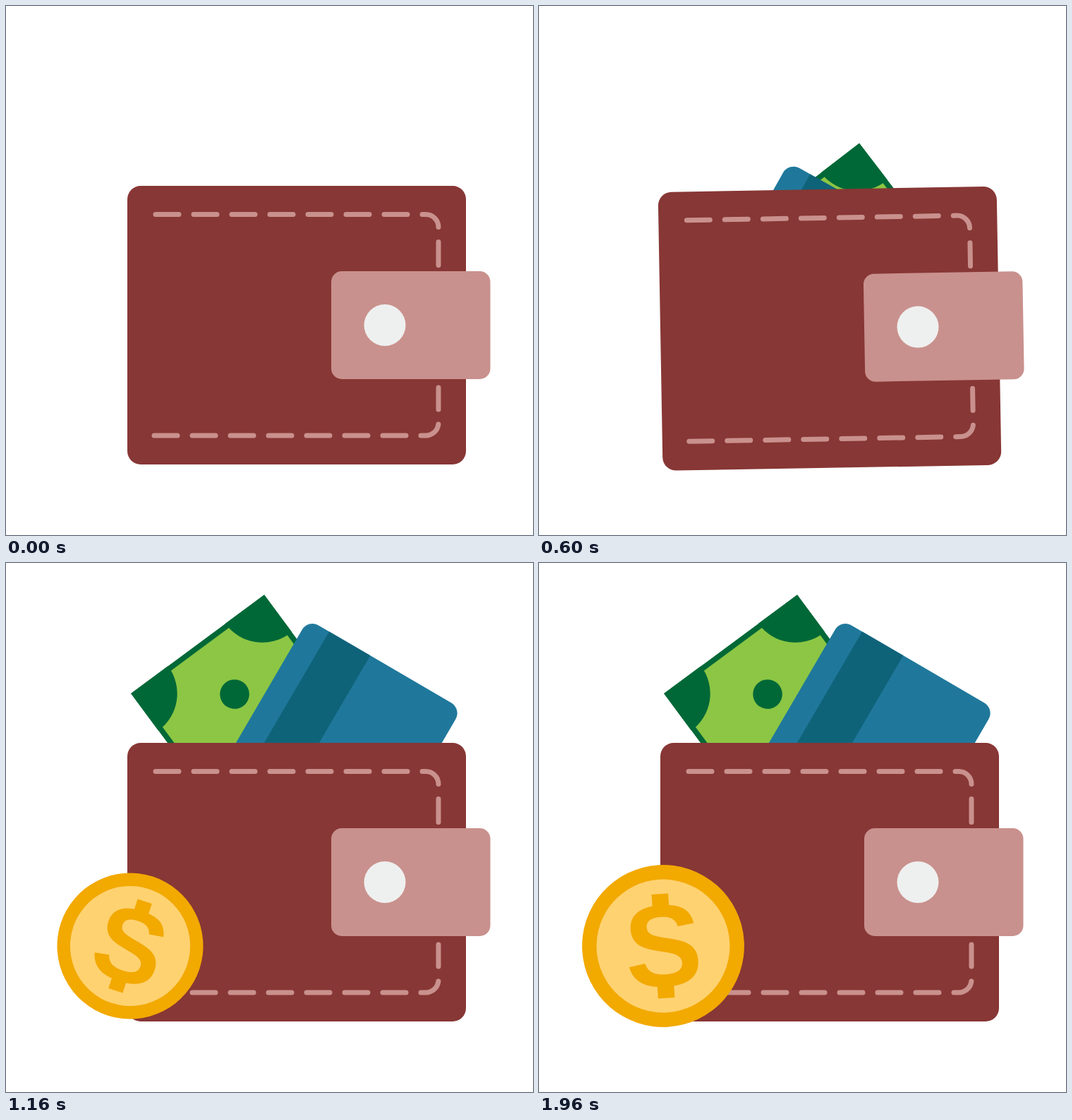
An HTML page that plays this animation: 747 px wide and 750 px high, repeating every 2000 ms.

```html
<!DOCTYPE html>
<html lang="en">
<head>
<meta charset="utf-8">
<title>Wallet</title>
<style>
  html, body { margin: 0; width: 100%; height: 100%; overflow: hidden; background: #fff; }
  svg { display: block; width: 100vw; height: 100vh; }
  .stitch { fill: none; stroke: #c9918d; stroke-width: 7; stroke-linecap: round; stroke-dasharray: 33 21; }
  .sign { fill: #f2a900; font: bold 164px "Liberation Sans", Arial, sans-serif; text-anchor: middle; }
</style>
</head>
<body>
<svg viewBox="0 0 747 750">
  <defs>
    <clipPath id="pocket"><rect x="-200" y="-300" width="1200" height="580"/></clipPath>
    <clipPath id="note"><rect width="235.2" height="400"/></clipPath>
  </defs>
  <g id="wallet">
    <g clip-path="url(#pocket)">
      <g id="bill">
        <g transform="translate(177 185) rotate(-36.5)" clip-path="url(#note)">
          <rect width="235.2" height="400" fill="#006837"/>
          <rect x="7.8" y="7.8" width="219.6" height="400" fill="#8cc644"/>
          <g fill="#006837">
            <circle cx="0.5" cy="0.5" r="65"/>
            <circle cx="231.5" cy="0.5" r="65"/>
            <circle cx="117.6" cy="88.3" r="20.8"/>
          </g>
        </g>
      </g>
      <g id="card">
        <g transform="translate(428.3 79.8) rotate(30.3)">
          <rect width="252" height="400" rx="17" fill="#1f789b"/>
          <rect x="34.5" width="67.4" height="400" fill="#0f6379"/>
        </g>
      </g>
    </g>
    <rect x="172" y="255" width="480" height="395" rx="19" fill="#873735"/>
    <path class="stitch" d="M212 295.5H595a18 18 0 0 1 18 18V380"/>
    <path class="stitch" d="M210 609H595a18 18 0 0 0 18 -18V541"/>
    <rect x="461" y="376" width="225.5" height="153" rx="15" fill="#c9918d"/>
    <circle cx="537" cy="452.5" r="29.5" fill="#eef0ef"/>
    <g id="coin">
      <circle r="115" fill="#f2a900"/>
      <circle r="94.5" fill="#ffd271"/>
      <text class="sign" y="56.5">S</text>
      <path d="M-11.8 -74h23.6v25h-23.6zM-11.8 49h23.6v25h-23.6z" fill="#f2a900"/>
    </g>
  </g>
</svg>
<script>
  const LOOP = 2000, STEP = 40;
  const [wallet, bill, card, coin] =
    ['wallet', 'bill', 'card', 'coin'].map(id => document.getElementById(id));

  const part = (t, from, to) => Math.min(1, Math.max(0, (t - from) / (to - from)));
  const ease = p => p * p * (3 - 2 * p);

  // Swing keys: [time, degrees]
  const swing = [[0, 0], [400, -10], [800, 8], [1080, 0]];
  function swingAt(t) {
    let angle = 0;
    for (let i = 1; i < swing.length; i++) {
      const [t0, a0] = swing[i - 1], [t1, a1] = swing[i];
      angle += (a1 - a0) * ease(part(t, t0, t1));
    }
    return angle;
  }

  // Damped wobble after the coin has landed, in seconds of its landing speed
  function wobble(t) {
    const s = Math.max(0, t - 1200) / 1000;
    return 0.05 * Math.sin(4 * Math.PI * s) * Math.exp(-4 * s);
  }

  const set = (el, value) => el.setAttribute('transform', value);

  function draw(t) {
    const hidden = 1 - part(t, 400, 800);
    const land = part(t, 800, 1200);
    const scale = land + 2.5 * wobble(t);
    const turn = -3.7 + 218 * (1 - land) - 340 * wobble(t);
    set(wallet, `rotate(${swingAt(t)} 686 452.5)`);
    set(bill, `translate(${185 * hidden} ${291 * hidden})`);
    set(card, `translate(${-140 * hidden} ${272 * hidden})`);
    set(coin, `translate(176 543) rotate(${turn}) scale(${scale})`);
    coin.style.display = scale > 0 ? '' : 'none';
  }

  const start = performance.now();
  function tick() {
    const t = performance.now() - start;
    draw(Math.floor((t + 5) / STEP) * STEP % LOOP);
    requestAnimationFrame(tick);
  }
  tick();
</script>
</body>
</html>
```
